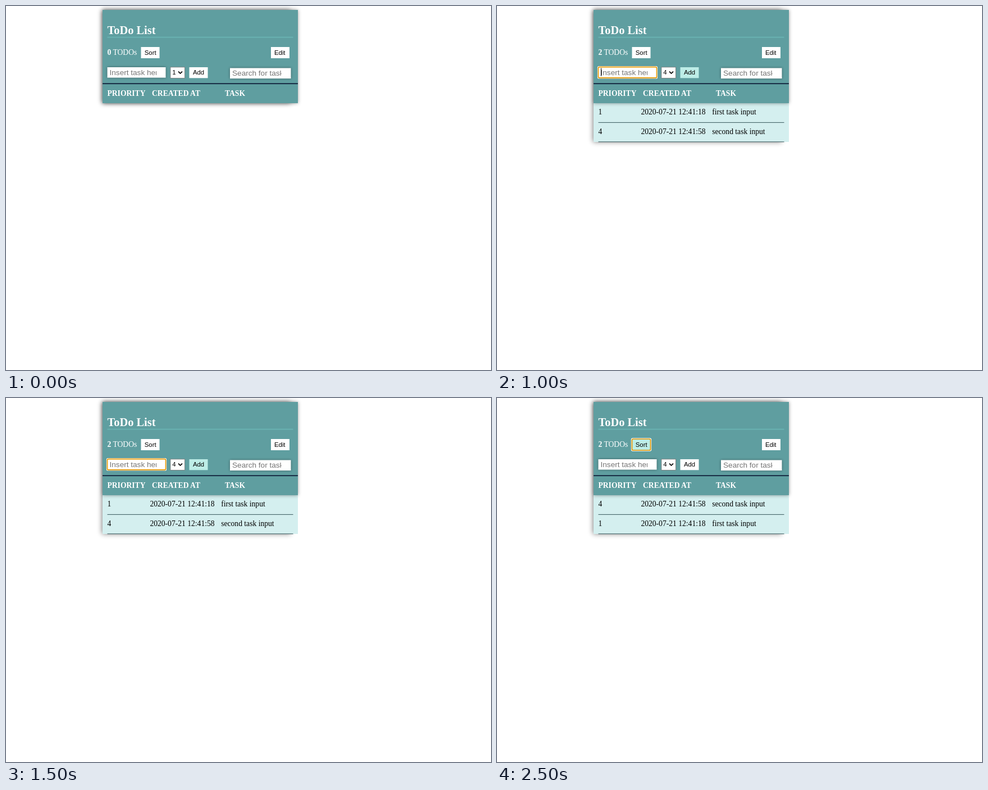
An HTML page for the animation above (3000 ms loop, 864x648 px).

```html
<!DOCTYPE html>
<html lang="en">
<head>
<meta charset="utf-8">
<title>ToDo List</title>
<style>
  html, body { margin: 0; width: 100%; height: 100%; overflow: hidden; background: #fff; }
  svg { display: block; }
  text { white-space: pre; }
  .serif { font: 13.6px "Liberation Serif", "Times New Roman", serif; }
  .sans { font: 11.33px "Liberation Sans", Arial, sans-serif; }
  .bold { font-weight: bold; }
  .title { font-size: 20.4px; font-weight: bold; }
  .white { fill: #fff; }
  .hint { font-size: 13.6px; fill: #757575; }
  .soft { filter: blur(5px); }
  .header { fill: cadetblue; filter: drop-shadow(0 0 3px rgba(0, 0, 0, .4)); }
  .field { fill: #fff; filter: drop-shadow(0 0 2px rgba(0, 0, 0, .4)); }
  .ring rect { fill: none; }
</style>
</head>
<body>
<svg width="864" height="648" viewBox="0 0 864 648">
  <defs>
    <clipPath id="insertClip"><rect x="184" y="109" width="84" height="19"/></clipPath>
    <clipPath id="searchClip"><rect x="402" y="110" width="88.5" height="19"/></clipPath>
  </defs>

  <rect id="shadow" class="soft" x="171" y="7" width="336" opacity=".5"/>
  <rect id="list" x="172" y="172" width="348" fill="#d4efef"/>
  <rect class="header" x="172" y="7" width="348" height="166"/>
  <rect x="180.5" y="54.8" width="331" height="1.7" fill="#6ab4b4"/>
  <rect x="172" y="137.4" width="348" height="1.7" fill="#0c1a35"/>

  <g class="serif white">
    <text class="title" x="180.5" y="50">ToDo List</text>
    <text x="180.5" y="87.3"><tspan id="count" class="bold"></tspan> TODOs</text>
    <g class="bold">
      <text x="180.5" y="159.5">PRIORITY</text>
      <text x="260" y="159.5">CREATED AT</text>
      <text x="390" y="159.5">TASK</text>
    </g>
  </g>

  <g class="sans">
    <rect id="sort" x="240.5" y="73" width="33" height="20"/>
    <text x="246.8" y="87">Sort</text>
    <rect class="white" x="472" y="73" width="33" height="20"/>
    <text x="478" y="87">Edit</text>
    <rect id="add" x="326.5" y="109" width="33" height="19.3"/>
    <text x="333" y="122.4">Add</text>

    <rect x="292.9" y="108.9" width="25.5" height="19.5" fill="#fff" stroke="#767676" stroke-width=".85"/>
    <text id="priority" x="296.2" y="122.4"></text>
    <path d="M307 116.6l3.5 3.5 3.5-3.5" fill="none" stroke="#000" stroke-width="1.7"/>

    <rect class="field" x="180.5" y="109" width="104" height="18.6"/>
    <text class="hint" x="184.5" y="122.6" clip-path="url(#insertClip)">Insert task here</text>
    <rect class="field" x="399" y="110.5" width="108.5" height="18.6"/>
    <text class="hint" x="403" y="124.1" clip-path="url(#searchClip)">Search for task</text>
  </g>

  <rect id="caret" x="185" y="110.5" width="1" height="14.5"/>
  <g id="ring" class="ring"></g>
  <g id="rows" class="serif"></g>
</svg>
<script>
const $ = id => document.getElementById(id);
const FIRST = ['1', '2020-07-21 12:41:18', 'first task input'];
const SECOND = ['4', '2020-07-21 12:41:58', 'second task input'];
const COLUMNS = [180.5, 256.4, 383.2];
const ROW_HEIGHT = 34.4, LIST_TOP = 173;

const steps = [
  { tasks: [], priority: 1 },
  { tasks: [FIRST], priority: 1, focus: 'insert', caret: true },
  { tasks: [FIRST, SECOND], priority: 4, focus: 'insert', caret: true },
  { tasks: [FIRST, SECOND], priority: 4, focus: 'insert' },
  { tasks: [FIRST, SECOND], priority: 4, focus: 'insert', caret: true },
  { tasks: [SECOND, FIRST], priority: 4, focus: 'sort' }
];
const focusBoxes = { insert: [180.5, 108.7, 104, 19.2], sort: [240.5, 73, 33, 20] };

function outline([x, y, w, h], grow, color, width) {
  return `<rect x="${x - grow}" y="${y - grow}" width="${w + 2 * grow}" height="${h + 2 * grow}"
    rx="2" stroke="${color}" stroke-width="${width}"/>`;
}

function focusRing(box) {
  return box ? outline(box, 1, '#fff', 1.4) + outline(box, 0, '#e59700', 1.7) : '';
}

function taskRow(task, i) {
  const top = LIST_TOP + i * ROW_HEIGHT;
  const cells = task.map((s, c) => `<text x="${COLUMNS[c]}" y="${top + 20.4}">${s}</text>`);
  return cells.join('') +
    `<rect x="180.5" y="${top + 33.9}" width="331" height="1" fill="#37575c"/>`;
}

function show({ tasks, priority, focus, caret }) {
  const height = tasks.length * ROW_HEIGHT;
  const buttonFill = active => active ? '#bdede7' : '#fff';
  $('shadow').setAttribute('height', 166 + height);
  $('list').setAttribute('height', height ? height + 1.2 : 0);
  $('count').textContent = tasks.length;
  $('priority').textContent = priority;
  $('add').setAttribute('fill', buttonFill(focus === 'insert'));
  $('sort').setAttribute('fill', buttonFill(focus === 'sort'));
  $('caret').setAttribute('opacity', caret ? 1 : 0);
  $('ring').innerHTML = focusRing(focusBoxes[focus]);
  $('rows').innerHTML = tasks.map(taskRow).join('');
}

let current = -1;
function tick() {
  const step = Math.floor(performance.now() % 3000 / 500);
  if (step !== current) show(steps[current = step]);
  requestAnimationFrame(tick);
}
tick();
</script>
</body>
</html>
```
